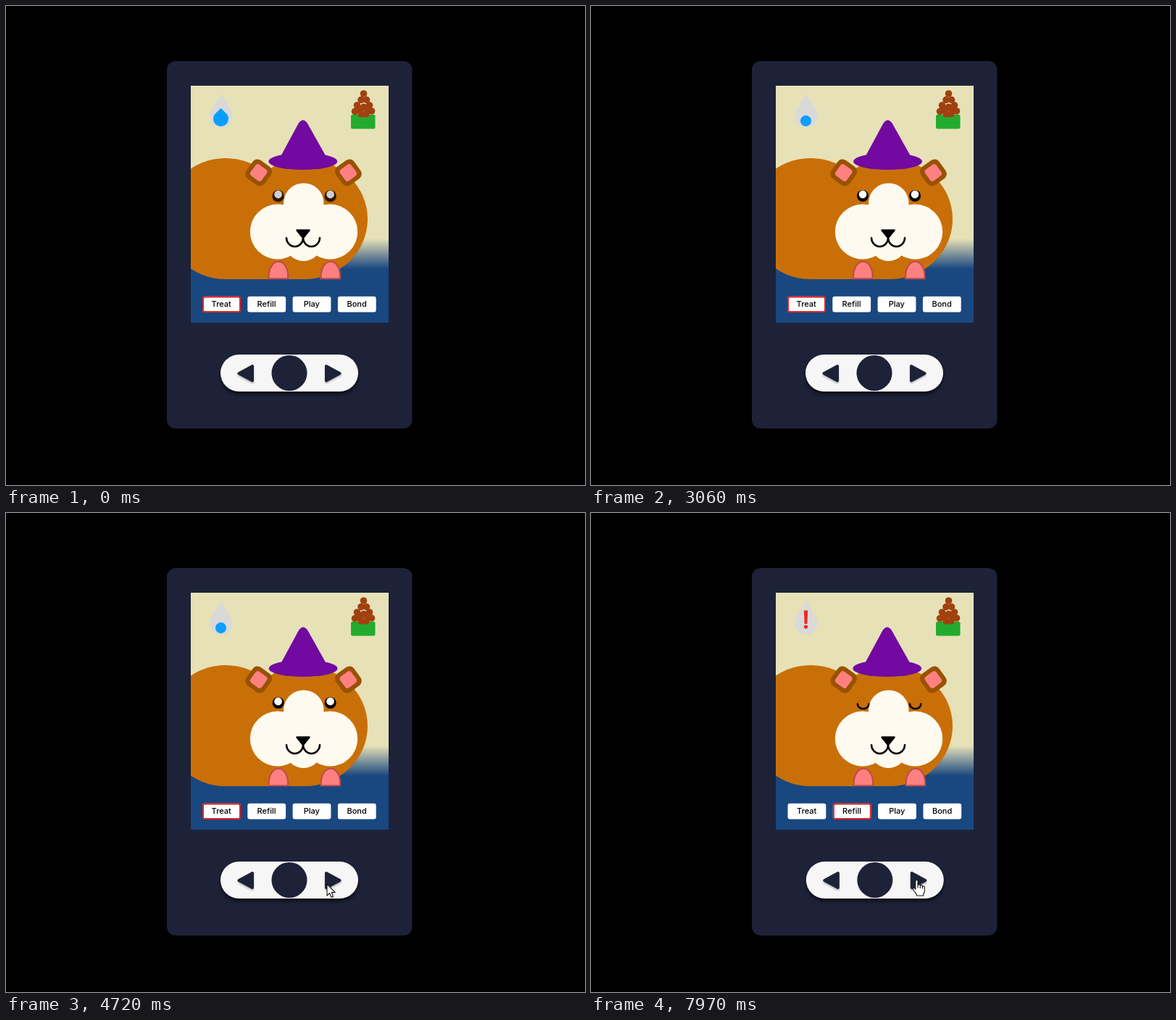
Animation of 799 by 661 pixels, one loop 8000 ms. Source, as an HTML page:

```html
<!DOCTYPE html>
<html lang="en">
<head>
<meta charset="utf-8">
<title>Pet console</title>
<style>
html, body { margin: 0; width: 100%; height: 100%; overflow: hidden; background: #000; }
svg { display: block; width: 799px; height: 661px; }
text { font: 500 11px Inter, Roboto, sans-serif; text-anchor: middle; }
.line { fill: none; stroke: #000; stroke-width: 2.5; stroke-linecap: round; }
.paw { fill: #ff8080; stroke: #bf4a4a; stroke-width: 2; }
.ring { fill: none; stroke: #e0211e; stroke-width: 2; }
.arrow { fill: #1d2238; stroke: #1d2238; stroke-width: 4; stroke-linejoin: round; filter: drop-shadow(0 2px 1px #0004); }
.cursor { fill: #fff; stroke: #111; stroke-width: 1.1; stroke-linejoin: round; }
</style>
</head>
<body>
<svg viewBox="0 0 799 661">
  <defs>
    <linearGradient id="room" gradientUnits="userSpaceOnUse" x1="0" y1="321" x2="0" y2="363">
      <stop stop-color="#e7e1b7"/><stop offset="1" stop-color="#19477f"/>
    </linearGradient>
    <clipPath id="screen"><rect x="255" y="110" width="273" height="327"/></clipPath>
    <g id="ear">
      <rect x="-15.5" y="-15.5" width="31" height="31" rx="8" fill="#995200"/>
      <rect x="-9.5" y="-9.5" width="19" height="19" rx="4" fill="#ff8080"/>
    </g>
  </defs>
  <rect x="222" y="76" width="338.5" height="507" rx="12" fill="#1d2238"/>
  <g clip-path="url(#screen)">
    <rect x="255" y="110" width="273" height="327" fill="url(#room)"/>
    <path id="well" fill="#d9d9d9"/>
    <path id="water" fill="#0a9fff"/>
    <g id="alert" fill="#f0281f">
      <path d="M293.8 134.5h5.4l-.8 18.5h-3.8z"/><circle cx="296.5" cy="157" r="2.6"/>
    </g>
    <rect x="476" y="150" width="33.5" height="19.5" rx="2" fill="#22ab2f"/>
    <g id="food" fill="#a0410f"></g>

    <g fill="#c96f08">
      <ellipse cx="303" cy="293.5" rx="85" ry="83.5"/>
      <rect x="303" y="250" width="108" height="127"/>
      <ellipse cx="412" cy="294" rx="87" ry="83"/>
    </g>
    <use href="#ear" transform="translate(348.7 230) rotate(36)"/>
    <use href="#ear" transform="translate(472.3 230) rotate(54)"/>
    <g fill="#fffaf0">
      <rect x="383" y="244.5" width="55.5" height="90" rx="27.5"/>
      <circle cx="374.8" cy="311.5" r="38"/>
      <circle cx="447.2" cy="311.5" r="38"/>
      <circle cx="410.5" cy="327" r="25"/>
    </g>
    <path d="M401.5 309.5h17l-8.5 10.5z" stroke="#000" stroke-width="2.5" stroke-linejoin="round"/>
    <path class="line" d="M387 320A11.5 12 0 0 0 410 320A11.5 12 0 0 0 433 320"/>

    <g id="hat" fill="#7209a0">
      <path d="M379 207L403.3 162Q409.5 153 415.7 162L441 207z"/>
      <ellipse cx="409.5" cy="214.5" rx="47.5" ry="11.5"/>
    </g>
    <g id="face">
      <g id="discs"><circle cx="375" cy="262" r="8"/><circle cx="447" cy="262" r="8"/></g>
      <g id="shines" fill="#fff"><circle cx="375" cy="260" r="5.4"/><circle cx="447" cy="260" r="5.4"/></g>
      <path id="lids" class="line" d="M367.3 263.5A7.7 6.8 0 0 0 382.7 263.5M439.3 263.5A7.7 6.8 0 0 0 454.7 263.5"/>
      <path class="paw" d="M362 376.2C361 345 390 345 388.5 376.2z"/>
      <path class="paw" d="M434 376.2C433 345 462 345 460.5 376.2z"/>
    </g>
    <g id="menu"></g>
  </g>

  <g id="pad">
    <rect x="296" y="481" width="190" height="51" rx="25.5" fill="#f6f6f6" style="filter:drop-shadow(0 4px 2px #0009)"/>
    <circle cx="391" cy="506.5" r="24.5" fill="#1d2238"/>
    <path class="arrow" d="M321.5 507L340 497V517z"/>
    <path class="arrow" d="M460.5 507L442 497V517z"/>
  </g>
  <path id="pointer" class="cursor" d="M0 0V16L3.6 12.6L6 18.3L8.6 17.2L6.2 11.6H11.2z"/>
  <path id="hand" class="cursor" d="M-1.7 1.5C-1.7-.6 1.5-.6 1.5 1.5V7.3C2.2 5.8 4.6 6 4.8 7.8C5.6 6.6 7.8 7 8 8.8C9 7.8 10.8 8.4 10.8 10.2V14.5C10.8 17 9.2 18.3 9.2 21.5H.2C0 18.5-3 16.5-4.8 13.2C-6 11-3.7 10-2.6 11.6L-1.7 12.8zM1.5 7.3V11M4.8 7.8V11.5M8 8.8V12"/>
</svg>
<script>
const LOOP = 8000;
const el = id => document.getElementById(id);
const ramp = (t, start, span) => Math.min(1, Math.max(0, (t - start) / span));
const easeOut = u => 1 - (1 - u) ** 3;
const mix = (a, b, k) => a + (b - a) * k;
const move = (id, x, y = 0) => el(id).setAttribute('transform', `translate(${x} ${y})`);
const fade = (id, v) => el(id).setAttribute('opacity', v);

// Circle with a point joined along its tangents
function drop(cx, cy, r, tip) {
  const d = cy - tip, y = r * r / d, x = r * Math.sqrt(Math.max(0, 1 - (r / d) ** 2));
  return `M${cx} ${tip}L${cx + x} ${cy - y}A${r} ${r} 0 1 1 ${cx - x} ${cy - y}z`;
}

el('well').setAttribute('d', drop(297, 152, 15.5, 121));
el('food').innerHTML = [
  [493.5, 121], [490, 129.5], [497.5, 129.5], [484.5, 137], [493.5, 139.5], [501.5, 137],
  [481.5, 145.5], [488.5, 144], [498.5, 144], [504.5, 145], [490, 149], [497, 149]
].map(([x, y]) => `<circle cx="${x}" cy="${y}" r="4.8"/>`).join('');

el('menu').innerHTML = ['Treat', 'Refill', 'Play', 'Bond'].map((name, i) => {
  const x = 271 + i * 62.3;
  const ring = i < 2 ? `<rect id="ring${i}" class="ring" x="${x + 1}" y="401.5" width="51" height="20.5" rx="2.5"/>` : '';
  return `<rect x="${x}" y="400.8" width="52.8" height="21.8" rx="3" fill="#fff"/>${ring}
    <text x="${x + 26.2}" y="415.4">${name}</text>`;
}).join('');

const blinks = [[-35, 1050], [3400, 4390], [6840, 7970]];

function draw(t) {
  let shut = 0, busy = 0;
  for (const [close, open] of blinks) {
    if (t < close) continue;
    const a = ramp(t, close, 470), b = ramp(t, open, 400);
    shut = easeOut(a) * (1 - easeOut(b));
    busy = (a > 0 && a < 1) || (b > 0 && b < 1) ? 0.6 : 0;
  }
  fade('discs', 1 - shut);
  fade('shines', 1 - shut);
  fade('lids', shut);
  move('face', busy);
  move('hat', busy - 1.4 * shut);

  const low = easeOut(ramp(t, 1710, 330));
  const r = mix(10.5, 7.5, low), cy = mix(155.7, 158.5, low);
  const dry = t >= 7970;
  el('water').setAttribute('d', drop(296.5, cy, r, mix(141, cy - r - 0.05, low)));
  fade('water', dry ? 0 : 1);
  fade('alert', dry ? 1 : 0);

  const pick = easeOut(ramp(t, 6230, 220));
  fade('ring0', 1 - pick);
  fade('ring1', pick);
  move('menu', 0.5 * pick);
  move('pad', 0.8 * pick);

  const glide = easeOut(ramp(t, 3060, 1000)), pressing = t >= 5980;
  move('pointer', mix(802, 443, glide), mix(640, 512, glide));
  fade('pointer', t > 3060 && !pressing ? 1 : 0);
  const back = ramp(t, 7200, 110);
  move('hand', mix(452.5, 449.5, back), mix(507.5, 506.5, back));
  fade('hand', pressing ? 1 : 0);
}

const start = performance.now();
function tick() {
  draw((performance.now() - start) % LOOP);
  requestAnimationFrame(tick);
}
tick();
</script>
</body>
</html>
```
